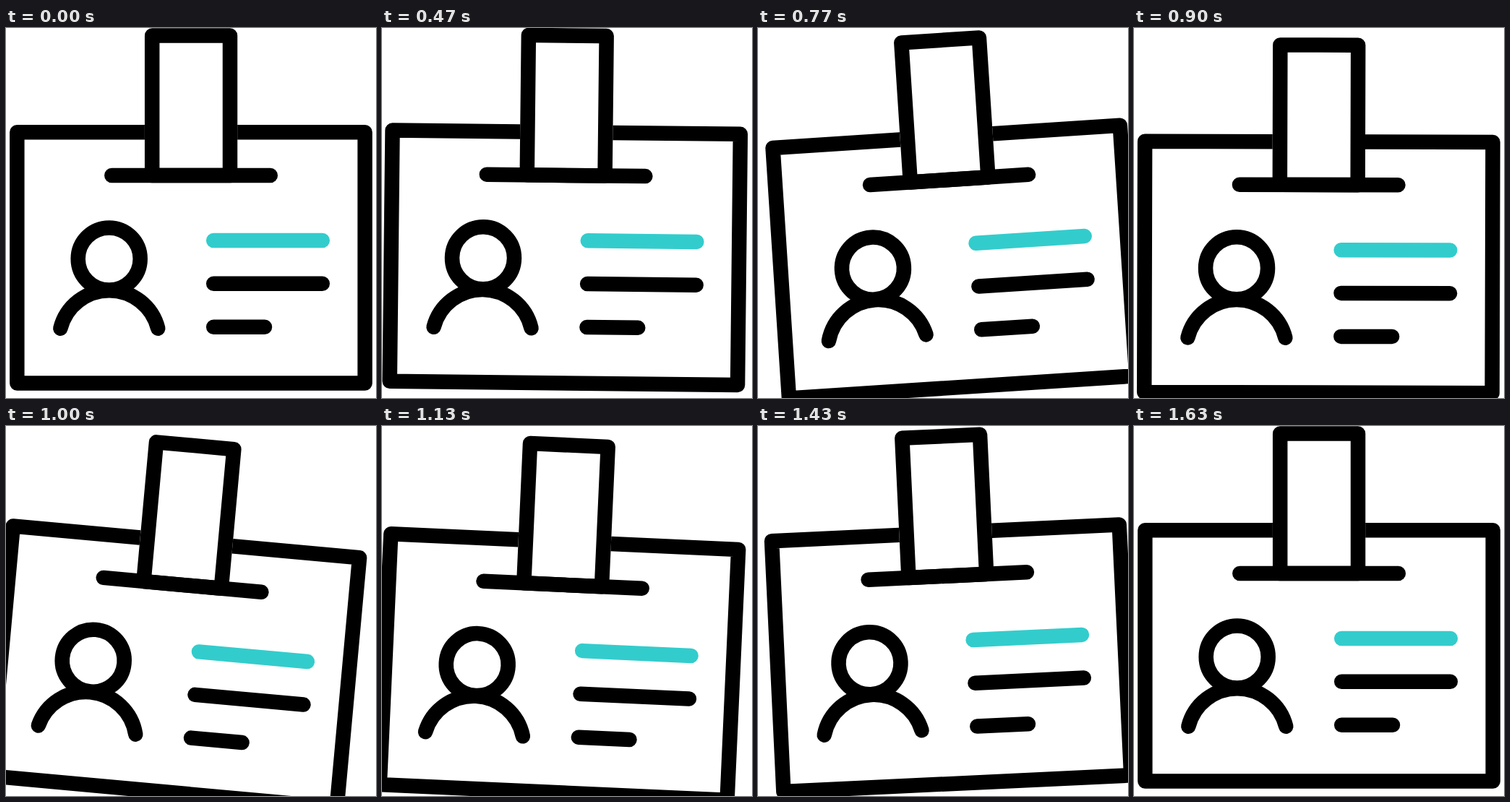
These frames come from a looping animation (512 px wide and 512 px high, 2500 ms). An HTML page:

```html
<!DOCTYPE html>
<html lang="en">
<head>
<meta charset="utf-8">
<title>Swinging badge</title>
<style>
  html, body {
    margin: 0;
    width: 100%;
    height: 100%;
    overflow: hidden;
    background: #fff;
  }
  svg {
    display: block;
    width: 100%;
    height: 100%;
  }
  #badge {
    fill: none;
    stroke: #000;
    stroke-width: 20.5;
    stroke-linejoin: round;
  }
  .round { stroke-linecap: round; }
  .accent { stroke: #33cccc; }
</style>
</head>
<body>
<svg viewBox="0 0 512 512">
  <g id="badge">
    <path d="M320.2 144.2H496.7V491.4H15.3V144.2H191.9"/>
    <path d="M202.2 203.9V10.5H310V203.9Z"/>
    <g class="round">
      <path d="M146.3 203.9H365.8"/>
      <circle cx="142.7" cy="319.5" r="43"/>
      <path d="M75.3 415.8A69.6 69.6 0 0 1 210.3 415.8"/>
      <path class="accent" d="M287.2 294H437.8"/>
      <path d="M287.2 353.7H437.8M287.2 413.7H358"/>
    </g>
  </g>
</svg>
<script>
  const LOOP = 2500;
  const FPS = 30;
  const PIVOT = "256 72";

  // [frame, value] keys, eased in and out between neighbours
  const swing = [[13, 0], [18.7, 7.7], [23.6, -4.2], [31, 5.7], [39, -4.17], [49, 0]];
  const drop = [[17, 0], [31.5, 17], [48, 0]];

  const badge = document.getElementById("badge");
  const ease = u => u * u * (3 - 2 * u);

  function valueAt(keys, frame) {
    const next = keys.findIndex(key => key[0] > frame);
    if (next < 1) return 0;
    const [t0, v0] = keys[next - 1];
    const [t1, v1] = keys[next];
    return v0 + (v1 - v0) * ease((frame - t0) / (t1 - t0));
  }

  function draw() {
    const time = performance.now() % LOOP;
    const frame = Math.floor(time * FPS / 1000 + 0.15);
    const angle = valueAt(swing, frame);
    const y = valueAt(drop, frame);
    badge.setAttribute("transform", `translate(0 ${y}) rotate(${angle} ${PIVOT})`);
    requestAnimationFrame(draw);
  }

  draw();
</script>
</body>
</html>
```
